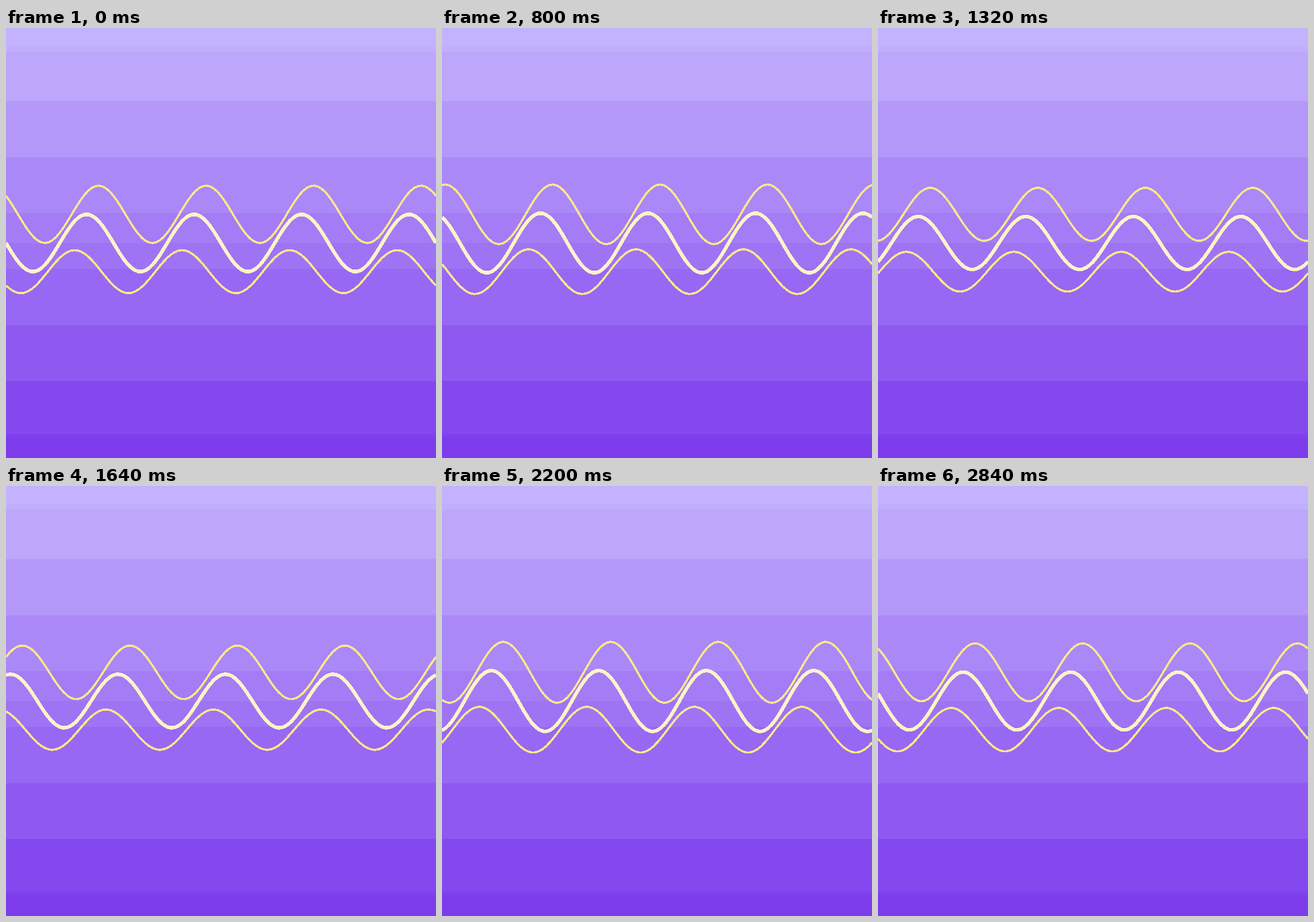
Recreate the animation shown at these times as an HTML page. Size 748 by 748 pixels, loop 2880 ms.

```html
<!DOCTYPE html>
<html lang="en">
<head>
<meta charset="utf-8">
<title>Waves</title>
<style>
  html, body { margin: 0; width: 100%; height: 100%; overflow: hidden; }
  svg { display: block; width: 100%; height: 100%; }
</style>
</head>
<body>
<svg viewBox="0 0 748 748" shape-rendering="crispEdges" fill="none" stroke-linejoin="round"></svg>
<script>
const SIZE = 748, LOOP = 2880, FRAME = 40, CYCLE = 960;
const STEP = SIZE / 120;
const svg = document.querySelector('svg');

function add(tag, attributes) {
  const node = document.createElementNS('http://www.w3.org/2000/svg', tag);
  for (const name in attributes) node.setAttribute(name, attributes[name]);
  return svg.appendChild(node);
}

// Banded gradient: each band takes the gradient's colour at its middle.
const TOP = [196, 181, 253], BOTTOM = [124, 58, 237];
const edges = [0, 31, 41, 127, 225, 322, 374, 419, 517, 614, 706, 712, SIZE];
edges.slice(1).forEach((end, i) => {
  const start = edges[i];
  const mix = (start + end) / 2 / SIZE;
  const rgb = TOP.map((c, k) => Math.round(c + (BOTTOM[k] - c) * mix));
  add('rect', { y: start, width: SIZE, height: end - start, fill: `rgb(${rgb})` });
});

const waves = [
  { y: 324.13, amplitude: 49.87, offset: -0.7, color: '#fde68a', width: 3.74 },
  { y: 423.87, amplitude: 37.4, offset: 0.7, color: '#fde68a', width: 3.74 },
  { y: 374, amplitude: 49.87, offset: 0, color: '#fef3c7', width: 6.23 },
];
for (const wave of waves) {
  wave.line = add('polyline', { stroke: wave.color, 'stroke-width': wave.width });
}

function draw(now) {
  const time = Math.floor((now % LOOP) / FRAME) * FRAME;
  const phase = 2 * Math.PI * time / CYCLE;
  const swell = 1 + 0.08 * Math.sin(phase / 2);
  for (const { y, amplitude, offset, line } of waves) {
    const points = [];
    for (let i = 0; i <= SIZE / STEP; i++) {
      const angle = 8 * Math.PI * i * STEP / SIZE + phase + offset;
      points.push(`${(i * STEP).toFixed(2)},${(y + amplitude * swell * Math.sin(angle)).toFixed(2)}`);
    }
    line.setAttribute('points', points.join(' '));
  }
}

function tick() {
  draw(performance.now());
  requestAnimationFrame(tick);
}
tick();
</script>
</body>
</html>
```
